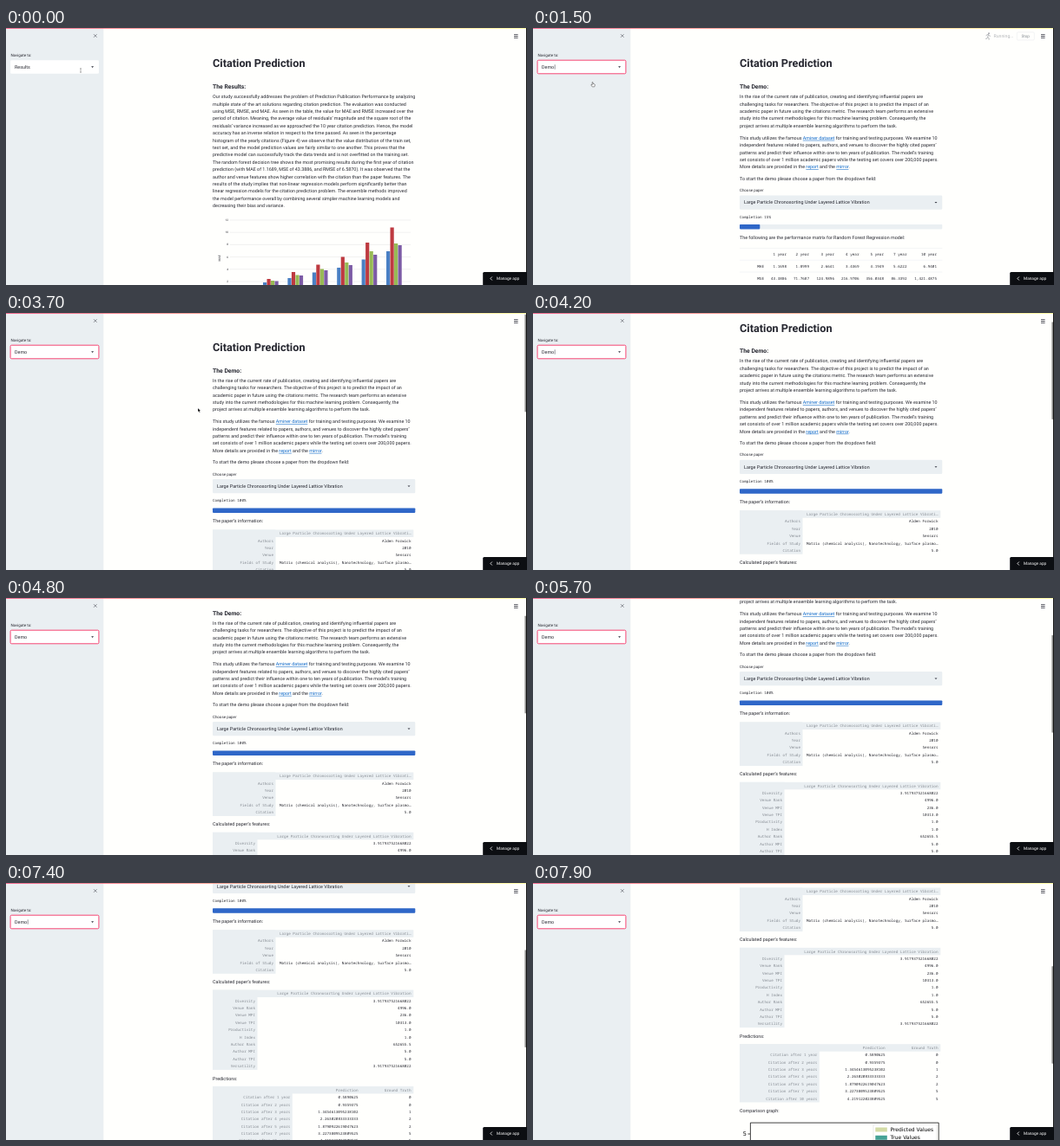
An HTML page that plays this animation: 600x297 px, repeating every 8000 ms.

```html
<!DOCTYPE html>
<html lang="en">
<head>
<meta charset="utf-8">
<title>Citation Prediction</title>
<style>
  html, body { margin: 0; width: 100%; height: 100%; overflow: hidden; background: #fffffd; }
  svg { display: block; width: 100vw; height: 100vh; }
  text { font-family: Roboto, sans-serif; fill: #262730; text-rendering: geometricPrecision; }
  .bold { font-weight: 700; }
  .mono { font-family: "Noto Sans Mono", monospace; }
  .plot { font-family: "DejaVu Sans", sans-serif; fill: #000; }
  .grey { fill: #858b92; }
  .pale { fill: #b4b6ba; }
  .white { fill: #fff; }
  .end { text-anchor: end; }
  .link { fill: #0b67c9; text-decoration: underline; }
</style>
</head>
<body>
<svg id="stage" viewBox="0 0 600 297" preserveAspectRatio="none"></svg>
<script>
const LOOP = 8000, STEP = 100;
const LEFT = 238, RIGHT = 471.3, LINE = 8.4, BODY = 5.38, MONO = 4.29;
const PANEL = '#eaeff2', PINK = '#f63366', BLUE = '#2f67c8';
const PAPER = 'Large Particle Chronosorting Under Layered Lattice Vibration';

// y is the visual middle of the line
const text = (x, y, str, cls = '', size = BODY) =>
  `<text x="${x}" y="${y + size * .33}" class="${cls}" font-size="${size}">${str}</text>`;
const rect = (x, y, w, h, fill, extra = '') =>
  `<rect x="${x}" y="${y}" width="${w}" height="${h}" fill="${fill}" ${extra}/>`;
const path = (d, stroke, width = .6, extra = '') =>
  `<path d="${d}" fill="none" stroke="${stroke}" stroke-width="${width}" ${extra}/>`;
const group = (id, body) => `<g id="${id}">${body}</g>`;
const arrow = (x, y) => `<path d="M${x - 1.5} ${y - .7}h3l-1.5 1.7z" fill="#31333f"/>`;
const link = str => `<tspan class="link">${str}</tspan>`;
const paragraph = (y, str) =>
  str.trim().split('\n').map((line, i) => text(LEFT, y + i * LINE, line.trim())).join('');
const title = heading =>
  text(LEFT, 41.3, 'Citation Prediction', 'bold', 12.7) + text(LEFT, 68, heading, 'bold', 6.8);

// First row is the header, first cell of each row the index
function table(y, split, stops, rows) {
  const cells = rows.map((row, r) => row.map((cell, c) => text(
    c ? stops[c - 1] : split - 2.5, y + r * 8.37, cell,
    'mono end' + (r && c ? '' : ' grey'), MONO)).join('')).join('');
  return rect(LEFT, y - 4.4, 231.3, 8.5, PANEL) +
    rect(LEFT, y - 4.4, split - LEFT, rows.length * 8.37 + .3, PANEL) + cells;
}

function metricsTable() {
  const stops = [266, 292, 318, 347, 375.5, 404, 430.5, 465];
  const rows = [
    ['', '1 year', '2 year', '3 year', '4 year', '5 year', '7 year', '10 year'],
    ['MAE', '1.1698', '1.8999', '2.6641', '3.4369', '4.1949', '5.6222', '6.9401'],
    ['MSE', '43.3886', '71.7687', '124.9896', '216.9706', '356.0348', '86.3392', '1,421.4875']];
  return rows.map((row, r) =>
    path(`M${LEFT} ${254.5 + r * 13.8}H${RIGHT}`, '#e6e8ec', .4) +
    row.map((cell, c) => text(stops[c], 261.5 + r * 13.8, cell, 'mono end', MONO)).join('')).join('');
}

function barChart() {
  const colors = ['#4a80c4', '#be3a40', '#98ba55', '#7c5ba5'];
  const tops = [[294, 290, 292, 292.5], [289, 282, 285.5, 286], [282.5, 273.5, 278.5, 280],
    [277, 264.5, 271, 274], [267.5, 248, 258, 262], [258, 230.5, 249, 251]];
  let out = `<g transform="translate(246 269.5) rotate(-90)">${text(0, 0, 'MAE', '', 3.4)}</g>`;
  for (let i = 0; i < 6; i++) {
    const y = 222 + i * 14.2;
    out += path(`M258 ${y}H466`, '#dcdcdc', .4) + text(256, y, 12 - 2 * i, 'end', 3.2);
  }
  tops.forEach((bars, g) => bars.forEach((y, b) => {
    out += rect(296 + g * 28.4 + b * 4.5, y, 4.2, 307 - y, colors[b]);
  }));
  return out;
}

function comparisonGraph() {
  return path('M250.4 620V523.6H467.2V620M247.5 536.5H250', '#111', .8) +
    text(246, 536.7, 5, 'plot end', 6.5) +
    rect(392, 525.6, 73, 30, '#fff', 'stroke="#d4d4d4" stroke-width=".5" rx="1"') +
    rect(394.3, 529, 13.5, 5, '#d3dba6') + text(411.5, 531.5, 'Predicted Values', 'plot', 6) +
    rect(394.3, 538.3, 13.5, 5, '#45a296') + text(411.5, 541, 'True Values', 'plot', 6);
}

const results = title('The Results:') + paragraph(79.4, `
  Our study successfully addresses the problem of Prediction Publication Performance by analyzing
  multiple state of the art solutions regarding citation prediction. The evaluation was conducted
  using MSE, RMSE, and MAE. As seen in the table, the value for MAE and RMSE increased over the
  period of citation. Meaning, the average value of residuals’ magnitude and the square root of the
  residuals’ variance increased as we approached the 10 year citation prediction. Hence, the model
  accuracy has an inverse relation in respect to the time passed. As seen in the percentage
  histogram of the yearly citations (Figure 4) we observe that the value distribution of the train set,
  test set, and the model prediction values are fairly similar to one another. This proves that the
  predictive model can successfully track the data trends and is not overfitted on the training set.
  The random forest decision tree shows the most promising results during the first year of citation
  prediction (with MAE of 1.1689, MSE of 43.3886, and RMSE of 6.5870). It was observed that the
  author and venue features show higher correlation with the citation than the paper features. The
  results of the study implies that non-linear regression models perform significantly better than
  linear regression models for the citation prediction problem. The ensemble methods improved
  the model performance overall by combining several simpler machine learning models and
  decreasing their bias and variance.`) + barChart();

const intro = title('The Demo:') + paragraph(79.5, `
  In the rise of the current rate of publication, creating and identifying influential papers are
  challenging tasks for researchers. The objective of this project is to predict the impact of an
  academic paper in future using the citations metric. The research team performs an extensive
  study into the current methodologies for this machine learning problem. Consequently, the
  project arrives at multiple ensemble learning algorithms to perform the task.`) + paragraph(127, `
  This study utilizes the famous ${link('Aminer dataset')} for training and testing purposes. We examine 10
  independent features related to papers, authors, and venues to discover the highly cited papers’
  patterns and predict their influence within one to ten years of publication. The model’s training
  set consists of over 1 million academic papers while the testing set covers over 200,000 papers.
  More details are provided in the ${link('report')} and the ${link('mirror')}.`) +
  text(LEFT, 173.8, 'To start the demo please choose a paper from the dropdown field:') +
  text(LEFT, 187.8, 'Choose paper', '', 4.45) +
  rect(LEFT, 193.4, 233.3, 16.4, PANEL, 'rx="1.3"') + text(243, 201.6, PAPER) + arrow(464, 201.6);

const progress = text(LEFT, 218.2, '', 'mono', MONO).replace('<text', '<text id="percent"') +
  rect(LEFT, 227, 233.3, 5.4, PANEL, 'rx=".8"') + rect(LEFT, 227, 0, 5.4, BLUE, 'id="bar" rx=".8"');

const metrics = text(LEFT, 242, 'The following are the performance matrix for Random Forest Regression model:') +
  metricsTable();

const report = text(LEFT, 241.7, 'The paper’s information:') +
  table(256.4, 310.5, [466.5], [['', PAPER.slice(0, -2) + '…'], ['Authors', 'Alden Forwick'],
    ['Year', '2010'], ['Venue', 'Sensors'],
    ['Fields of Study', 'Matrix (chemical analysis), Nanotechnology, Surface plasmo…'], ['Citation', '5.0']]) +
  text(LEFT, 311.6, 'Calculated paper’s features:') +
  table(325.7, 289.5, [466.5], [['', PAPER], ['Diversity', '3.917937521668022'], ['Venue Rank', '4996.0'],
    ['Venue MPI', '236.0'], ['Venue TPI', '10313.0'], ['Productivity', '1.0'], ['H Index', '1.0'],
    ['Author Rank', '652655.5'], ['Author MPI', '5.0'], ['Author TPI', '5.0'],
    ['Versatility', '3.917937521668022']]) +
  text(LEFT, 423.5, 'Predictions:') +
  table(437.1, 329.8, [405.5, 466.5], [['', 'Prediction', 'Ground Truth'],
    ['Citation after 1 year', '0.5890625', 0], ['Citation after 2 years', '0.9359375', 0],
    ['Citation after 3 years', '1.3454613095238102', 1], ['Citation after 4 years', '2.263020833333333', 2],
    ['Citation after 5 years', '1.8790922619047623', 2], ['Citation after 7 years', '3.2273809523809525', 5],
    ['Citation after 10 years', '4.219122023809525', 5]]) +
  text(LEFT, 509.6, 'Comparison graph:') + comparisonGraph();

const sidebar = rect(0, 0, 112.3, 297, PANEL) +
  path('M101 7.2l3.6 3.6m0-3.6l-3.6 3.6', '#4a4c55') + text(5.4, 31.2, 'Navigate to:', '', 4.5) +
  rect(5.1, 37.2, 101.8, 15.6, '#fff', 'id="select" rx="1.3" stroke-width=".9"') +
  text(10, 45, 'Results').replace('<text', '<text id="choice"') + arrow(99.6, 45) +
  path('M25.2 42.3v5.4', '#262730', .5, 'id="caret"');

const chrome = rect(0, 0, 600, .7, 'url(#rainbow)') + rect(599, 0, 1, 297, '#111') +
  path('M585 7.6h4.6m-4.6 1.9h4.6m-4.6 1.9h4.6', '#31333f', .8) +
  group('running', path('M524.6 7.6l-1 3 1.6 1.2-.2 2m-1.4-3.2l-.8 1.6-1.6.3m.6-3.4l1-1.4 1.8-.1 1 1.5 1.3.2', '#9a9ca3', .7) +
    '<circle cx="525" cy="6.2" r=".9" fill="#9a9ca3"/>' +
    text(530.5, 9.5, 'Running...', 'pale', 5.2) +
    rect(557.3, 4.8, 20, 9.2, 'none', 'stroke="#e4e6ea" stroke-width=".5" rx="1.3"') +
    text(562.4, 9.5, 'Stop', 'grey', 4.7)) +
  rect(597.4, 0, 1.6, 113, '#8a8a8a', 'id="thumb" rx=".8"') +
  rect(549.2, 282, 52, 17, '#0c0e12', 'rx="1.5"') +
  path('M559.8 287.5l-1.9 2 1.9 2', '#fff', .8) + text(565, 289.6, 'Manage app', 'white', 4.75);

const cursors =
  group('beam', path('M-1-2.4q1 0 1 .8v3.2q0 .8-1 .8m2-4.8q-1 0-1 .8m0 3.2q0 .8 1 .8', '#444', .4)) +
  group('hand', '<path d="M-.8-2.6q.6-.5.9.2v1.5l1.8.5q.5.2.4 1l-.5 2h-2.6l-1.4-2q0-.7.8-.4l.6.4z" fill="#fff" stroke="#222" stroke-width=".45"/>') +
  group('pointer', '<path d="M0-2v4.2l1-.9.7 1.6.8-.4-.7-1.5h1.3z" fill="#000" stroke="#fff" stroke-width=".25"/>');

const stage = document.getElementById('stage');
stage.innerHTML = `<linearGradient id="rainbow"><stop stop-color="${PINK}"/><stop offset="1" stop-color="#fffd80"/></linearGradient>` +
  group('results', results) +
  group('demo', intro + group('progress', progress) + group('metrics', metrics) + group('report', report)) +
  sidebar + chrome + group('cursor', cursors);

const el = id => document.getElementById(id);
const show = (id, on) => el(id).setAttribute('visibility', on ? 'inherit' : 'hidden');
const clamp = (v, lo, hi) => Math.min(hi, Math.max(lo, v));

// Linear interpolation through [time, value] keys
function at(t, keys) {
  const i = keys.findIndex(key => key[0] > t);
  if (i < 0) return keys[keys.length - 1][1];
  if (i === 0) return keys[0][1];
  const [t0, v0] = keys[i - 1], [t1, v1] = keys[i];
  return v0 + (v1 - v0) * (t - t0) / (t1 - t0);
}

const scrollKeys = [[3600, 0], [3700, 1.5], [4800, 50.5], [5700, 108.5], [5900, 108.5],
  [6800, 164.5], [7200, 188], [7300, 188], [7900, 246.5]];
const cursorX = [[100, 86], [700, 69], [2600, 69], [3600, 221]];
const cursorY = [[100, 49], [700, 65.3], [2600, 65.3], [3600, 112]];

function draw(t) {
  const focused = t >= 200, chosen = t >= 800, onDemo = t >= 900;
  const started = t >= 1200, done = t >= 3500;
  const percent = Math.floor(clamp((t - 1200) / 20, 0, 100) / 5) * 5;
  const scroll = at(t, scrollKeys);

  show('results', !onDemo);
  show('demo', onDemo);
  show('progress', started);
  show('metrics', started && !done);
  show('report', done);
  show('running', t >= 1000 && t < 3400);
  show('thumb', t >= 3600);
  show('caret', chosen && t % 1000 >= 100 && t % 1000 < 600);

  el('demo').setAttribute('transform', `translate(0 ${-scroll})`);
  el('thumb').setAttribute('y', 1 + scroll * .385);
  el('select').setAttribute('stroke', focused ? PINK : 'none');
  el('choice').textContent = chosen ? 'Demo' : 'Results';
  el('percent').textContent = `Completion ${percent}%`;
  el('bar').setAttribute('width', clamp((t - 1300) / 2000, 0, 1) * 233.3);

  const x = at(t, cursorX), y = at(t, cursorY);
  el('cursor').setAttribute('transform', `translate(${x} ${y})`);
  show('cursor', t < 3900);
  show('beam', t < 3900 && y < 53);
  show('hand', t < 3900 && y >= 53 && x < 107);
  show('pointer', t < 3900 && x >= 107);
}

function tick(now) {
  draw(Math.floor(now % LOOP / STEP) * STEP);
  requestAnimationFrame(tick);
}
draw(0);
requestAnimationFrame(tick);
</script>
</body>
</html>
```
